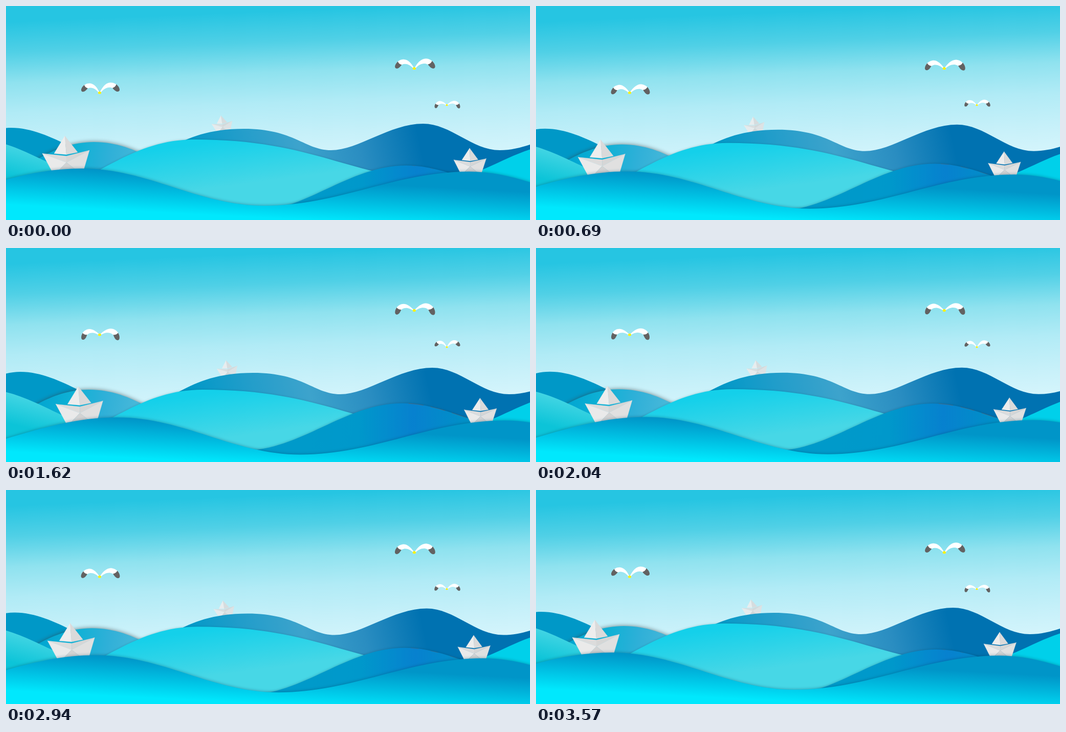
These frames come from a looping animation (1024 px wide and 420 px high, 3600 ms). An HTML page with a canvas:

```html
<!DOCTYPE html>
<html lang="en">
<head>
<meta charset="utf-8">
<title>Paper boats</title>
<style>
html, body { margin: 0; width: 1024px; height: 420px; overflow: hidden; }
canvas { display: block; }
</style>
</head>
<body>
<canvas id="sea" width="1024" height="420"></canvas>
<script>
const ctx = document.getElementById('sea').getContext('2d');
const LOOP = 3600, STEP = 30, HALF = 1785;
const ROUND = .364;            // handle length that makes a cosine-like swell
const BROAD = .5, TIGHT = .2;  // wide crests, narrow troughs

function gradient(x0, y0, x1, y1, ...colors) {
  const g = ctx.createLinearGradient(x0, y0, x1, y1);
  colors.forEach((c, i) => g.addColorStop(i / (colors.length - 1), c));
  return g;
}

// Swell through its crests and troughs, level at each of them
function swell(keys) {
  const path = new Path2D();
  path.moveTo(keys[0][0], keys[0][1]);
  for (let i = 1; i < keys.length; i++) {
    const [x0, y0, h0 = ROUND] = keys[i - 1];
    const [x1, y1, h1 = ROUND] = keys[i];
    const w = x1 - x0;
    path.bezierCurveTo(x0 + w * h0, y0, x1 - w * h1, y1, x1, y1);
  }
  return path;
}

function wave(keys, dx, dy, fill, shadow, blur) {
  const body = swell(keys);
  body.lineTo(keys[keys.length - 1][0], 480);
  body.lineTo(keys[0][0], 480);
  body.closePath();
  return { body, dx, dy, fill, shadow, blur };
}

const sky = gradient(774, 0, 786, 300,
  '#26c5e2', '#50d0e6', '#8fe2ef', '#b1ebf6', '#c5f0f9', '#d6f5fc');

const back = wave(
  [[-190, 310], [10, 239], [230, 312, .3], [465, 241, BROAD + .08], [635, 283, TIGHT + .1],
   [815, 231], [965, 283], [1140, 240]],
  20, 4.5,
  gradient(350, 330, 800, 230, '#0098c7', '#219dca', '#3da3cc', '#2a8dc1', '#0072b1'));

const hill = wave(
  [[5, 325, TIGHT], [172, 267, BROAD], [352, 330, TIGHT]], -11, 12,
  gradient(75, 285, 265, 310, '#02a6d1', '#0fb1d5', '#2fb0d8', '#48b8d9'),
  'rgba(50,60,65,.65)', 9);

const light = [
  wave([[-65, 260.5], [212, 345]], 18, 17.6,
    gradient(30, 275, 15, 335, '#45d6e4', '#0cc4d8')),
  wave([[130, 340, TIGHT], [368, 262, BROAD], [850, 340]], 18, 17.6,
    gradient(420, 264, 432, 354, '#14d0ea', '#47d7e6'),
    'rgba(0,70,90,.28)', 4),
  wave([[850, 340], [1080, 272]], 18, 17.6, '#00d0ea')
];

const ridgeTop = [782, 313], ridgeEnd = [1010, 362];
const ridge = wave(
  [[470, 406], ridgeTop, ridgeEnd], -8, -9,
  gradient(590, 350, 910, 350, '#009aca', '#0098cb', '#0781cf', '#0091c7'),
  'rgba(0,60,90,.35)', 5);
const ridgeEdge = swell([ridgeTop, ridgeEnd]);

const front = wave(
  [[-280, 400], [148, 319], [505, 392], [905, 325], [1215, 390]], 77, 15,
  gradient(150, 320, 146, 397, '#0095c8', '#00bee2', '#00e8fd'),
  'rgba(0,65,95,.45)', 6);

function drawWave(w, p) {
  ctx.save();
  ctx.translate(w.dx * p, w.dy * p);
  if (w.shadow) {
    ctx.shadowColor = w.shadow;
    ctx.shadowBlur = w.blur;
  }
  ctx.fillStyle = w.fill;
  ctx.fill(w.body);
  ctx.restore();
}

function drawEdge(p) {
  ctx.save();
  ctx.translate(ridge.dx * p, ridge.dy * p);
  ctx.globalAlpha = .25 + .4 * p;
  ctx.strokeStyle = '#80584f';
  ctx.lineWidth = .8;
  ctx.setLineDash([6 + 26 * p, 30 - 18 * p]);
  ctx.lineDashOffset = -12;
  ctx.stroke(ridgeEdge);
  ctx.restore();
}

// Corners of the folded paper, measured from the top of the sail
const corner = {
  top: [0, 0], sailL: [-21, 34.5], sailM: [3, 36.5], sailR: [25, 32],
  bow: [48, 28.3], stern: [-44, 34.5], rim: [3, 39.5], fold: [3, 52],
  keelL: [-21, 77], keelR: [34, 76]
};
const faces = [
  ['#ededed', 'top sailL sailM'],
  ['#dadada', 'top sailM sailR'],
  ['#dcdcdc', 'stern rim fold'],
  ['#d6d6d6', 'bow rim fold'],
  ['#eaeaea', 'stern fold keelL'],
  ['#e0e0e0', 'bow fold keelR'],
  ['#d3d3d3', 'fold keelL keelR']
];

function drawBoat(x, y, dx, dy, scale, turn, alpha, p) {
  ctx.save();
  ctx.translate(x + dx * p, y + dy * p);
  ctx.rotate(turn);
  ctx.scale(scale, scale);
  ctx.globalAlpha = alpha;
  ctx.lineWidth = .4;
  for (const [color, names] of faces) {
    ctx.beginPath();
    for (const name of names.split(' ')) ctx.lineTo(...corner[name]);
    ctx.closePath();
    ctx.fillStyle = ctx.strokeStyle = color;
    ctx.fill();
    ctx.stroke();
  }
  ctx.restore();
}

const wing = new Path2D('M-1 3C4-9 11-18 20-18C26-18 31-15 34-11L27-5C22-11 10-12 0 3Z');
const tip = new Path2D('M30.5-14.5C34-12 37-7 36.5-4C36-1 32.5-.5 30-2C28-3 26-5 23.5-8C27-9 29.5-11 30.5-14.5Z');

function drawWing(side, scale, turn) {
  ctx.save();
  ctx.scale(side * scale, scale);
  ctx.rotate(turn);
  ctx.fillStyle = '#fff';
  ctx.fill(wing);
  ctx.fillStyle = '#626262';
  ctx.fill(tip);
  ctx.restore();
}

// The left wing is seen a little shorter than the right one
function drawBird(x, y, size, rest, flap, p) {
  const turn = rest + flap * p;
  ctx.save();
  ctx.translate(x, y);
  drawWing(-1, size * .94, turn);
  drawWing(1, size * 1.02, turn);
  ctx.fillStyle = '#fff200';
  ctx.beginPath();
  ctx.ellipse(0, .5, size * 2.8, size * 2.4, 0, 0, 7);
  ctx.fill();
  ctx.restore();
}

function draw(now) {
  const t = Math.floor((now % LOOP) / STEP) * STEP;
  const p = 1 - Math.abs(1 - t / HALF);
  ctx.fillStyle = sky;
  ctx.fillRect(0, 0, 1024, 420);
  drawBird(183, 169.7, 1.05, -.01, .4, p);
  drawBird(797.8, 122, 1.09, .055, .26, p);
  drawBird(861.5, 194, .7, .33, -.37, p);
  drawBoat(420, 215, 11, 6, .44, -.08, .88, p);
  for (const w of [back, hill, ...light, ridge]) drawWave(w, p);
  drawEdge(p);
  drawBoat(115, 255, 29, 18.6, 1, 0, 1, p);
  drawBoat(906, 279, 22.4, 17.2, .69, .03, 1, p);
  drawWave(front, p);
}

const start = performance.now();
function tick() {
  draw(performance.now() - start);
  requestAnimationFrame(tick);
}
tick();
</script>
</body>
</html>
```
